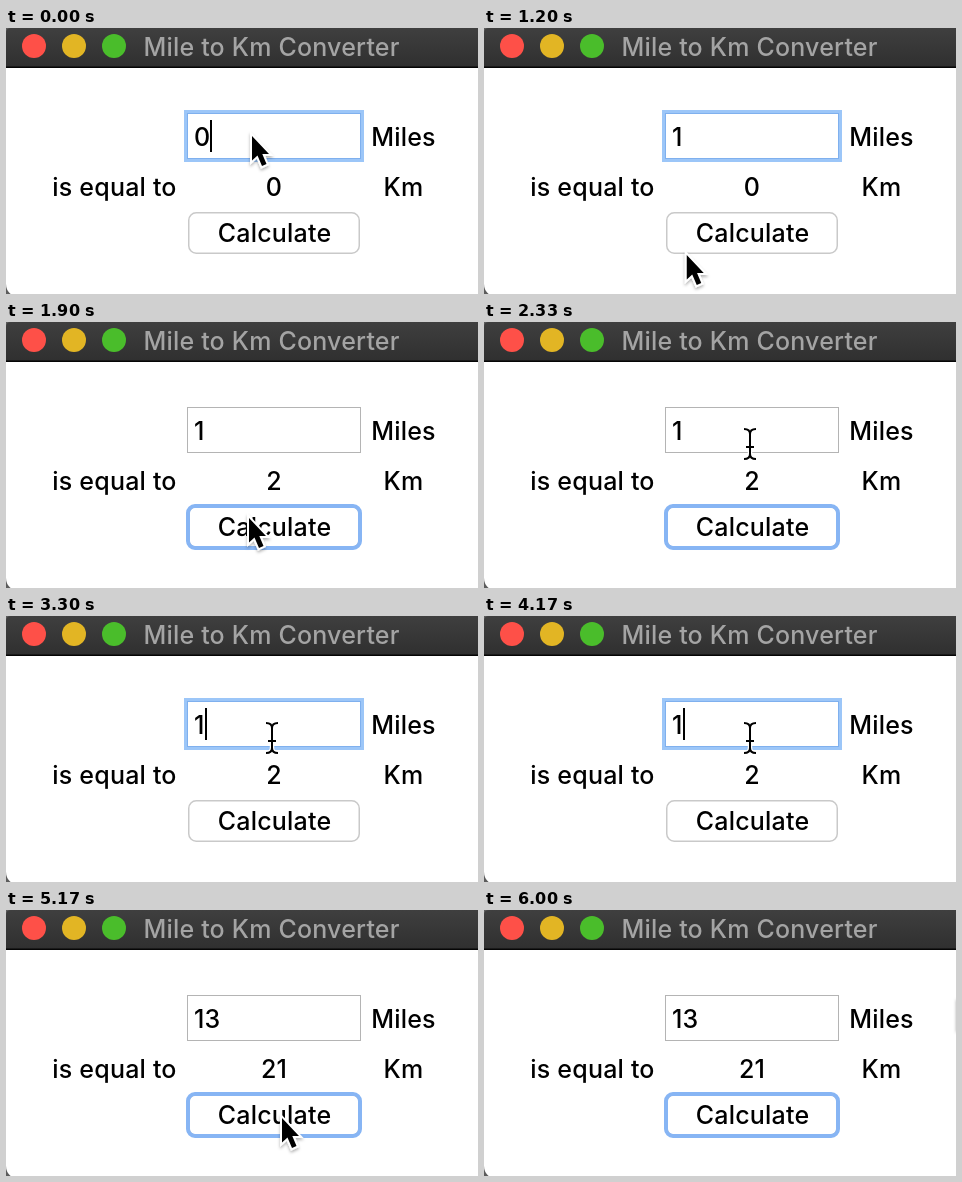
Recreate the animation shown at these times as an HTML page. Size 472x266 px, loop 6360 ms.

```html
<!DOCTYPE html>
<html lang="en">
<head>
<meta charset="utf-8">
<title>Mile to Km Converter</title>
<style>
  html, body { margin: 0; width: 100%; height: 100%; overflow: hidden; background: #fff; }
  svg { display: block; width: 472px; height: 266px; }
  text {
    font: 450 25px Inter, "Liberation Sans", sans-serif;
    font-optical-sizing: none;
    letter-spacing: .2px;
    fill: #000;
  }
  .mid { text-anchor: middle; }
  .line { fill: none; stroke: #000; stroke-width: 2; }
  .halo { fill: none; stroke: #fff; stroke-width: 4.5; }
</style>
</head>
<body>
<svg viewBox="0 0 472 266">
  <defs>
    <linearGradient id="bar" x2="0" y2="1">
      <stop stop-color="#3f3f3f"/><stop offset="1" stop-color="#2f2f2f"/>
    </linearGradient>
    <linearGradient id="blue" x2="0" y2="1">
      <stop stop-color="#4f9bf8"/><stop offset="1" stop-color="#176ee0"/>
    </linearGradient>
    <filter id="shadow" x="-50%" y="-50%" width="200%" height="200%">
      <feDropShadow dx="0" dy="2" stdDeviation="1.5" flood-opacity=".3"/>
    </filter>
    <path id="beam" d="M-6-15Q0-15 0-10V10Q0 15-6 15M6-15Q0-15 0-10M0 10Q0 15 6 15M-4 3H4"/>
  </defs>

  <!-- window -->
  <rect width="472" height="266" fill="#5c5c5c"/>
  <path d="M0 39V256Q0 263 6 267H472V39Z" fill="#fff"/>
  <path d="M0 40V5Q0 0 5 0H472V40Z" fill="url(#bar)"/>
  <rect y="38.5" width="472" height="1.5" fill="#050505"/>
  <circle cx="28" cy="18" r="12" fill="#fe5048"/>
  <circle cx="68" cy="18" r="12" fill="#e2b524"/>
  <circle cx="108" cy="18" r="12" fill="#4abd2b"/>
  <text class="mid" x="265.5" y="27.5" style="fill:#a4a4a4">Mile to Km Converter</text>

  <!-- labels -->
  <text class="mid" x="397.5" y="118">Miles</text>
  <text class="mid" x="108.5" y="168">is equal to</text>
  <text class="mid" x="397.5" y="168">Km</text>
  <text class="mid" x="268" y="168" id="result">0</text>

  <!-- entry -->
  <rect x="181.5" y="85.5" width="173" height="45" fill="#fff" stroke="#b4b4b4"/>
  <g id="entryRing" fill="none">
    <rect x="180" y="84" width="176" height="48" stroke="#9cc6f8" stroke-width="4"/>
    <rect x="181.5" y="85.5" width="173" height="45" stroke="#7fb0ee"/>
  </g>
  <text x="188" y="118" id="entry">0</text>
  <rect id="caret" y="92" width="2" height="32"/>

  <!-- button -->
  <rect x="182.75" y="184.75" width="170.5" height="40.5" rx="7.5" fill="#fff" stroke="#c9c9c9" stroke-width="1.5"/>
  <rect id="press" x="183" y="185" width="170" height="40" rx="7" fill="url(#blue)"/>
  <rect id="buttonRing" x="182" y="184" width="172" height="42" rx="7" fill="none" stroke="#87b5f4" stroke-width="4"/>
  <text class="mid" x="268.5" y="214" id="label">Calculate</text>

  <!-- pointers -->
  <g id="arrow" filter="url(#shadow)">
    <path d="M0 0V24.5L5.5 19.5L10 30L14.5 28L10.3 18H17Z" stroke="#fff" stroke-width="4" paint-order="stroke"/>
  </g>
  <g id="ibeam">
    <use href="#beam" class="halo"/>
    <use href="#beam" class="line"/>
  </g>
</svg>
<script>
  const LOOP = 6360, HOLD = 70, FADE = 60, TEXT_X = 188;
  const CLICK_1 = 1500, REFOCUS = 2370, CLICK_2 = 4970;
  const $ = id => document.getElementById(id);
  const show = (id, on) => $(id).setAttribute("visibility", on ? "visible" : "hidden");
  const clamp = v => Math.min(1, Math.max(0, v));
  const mix = (a, b, k) => a + (b - a) * k;
  const ease = k => k * k * (3 - 2 * k);

  // Pointer strokes; `via` bends the way into a quadratic curve
  const home = [246, 108];
  const moves = [
    { from: 950, until: 1450, to: [243, 196], via: [161, 302] },
    { from: 1900, until: 2300, to: [266, 122], via: [246, 252] },
    { from: 4667, until: 4833, to: [275, 216] },
    { from: 4967, until: 5133, to: [276, 208] },
    { from: 5667, until: 5767, to: [474, 92] }
  ];

  function pointerAt(t) {
    return moves.reduce((p, { from, until, to, via }) => {
      const k = ease(clamp((t - from) / (until - from)));
      return p.map((a, i) => {
        const c = via ? via[i] : mix(a, to[i], 0.5);
        return mix(mix(a, c, k), mix(c, to[i], k), k);
      });
    }, home);
  }

  function typedAt(t) {
    if (t < 665) return "0";
    return "13".slice(0, (t >= 900) + (t >= 4400));
  }

  // The sum is done when the button is let go
  function resultAt(t) {
    const last = [CLICK_2, CLICK_1].find(c => t >= c + HOLD);
    return last ? Math.round(typedAt(last) * 1.609) : 0;
  }

  function pressAt(t) {
    const down = t >= CLICK_2 ? CLICK_2 : CLICK_1;
    return t < down ? 0 : 1 - clamp((t - down - HOLD) / FADE);
  }

  // 600 ms on, 300 ms off
  function blinkAt(t) {
    const origin = t < REFOCUS ? 370 - 900 : REFOCUS;
    return (t - origin) % 900 < 600;
  }

  function draw(t) {
    const tick = Math.floor((t + 4) * 0.03) / 0.03; // the screen moves at 30 fps
    const onButton = (t >= CLICK_1 && t < REFOCUS) || t >= CLICK_2;
    show("entryRing", !onButton);
    show("buttonRing", onButton);

    $("entry").textContent = typedAt(t);
    $("result").textContent = resultAt(t);
    const atStart = t >= 2800 && t < 3300;
    const width = atStart ? 0 : $("entry").getComputedTextLength();
    $("caret").setAttribute("x", TEXT_X + Math.round(width));
    show("caret", !onButton && blinkAt(t));

    const press = pressAt(tick);
    $("press").setAttribute("opacity", press);
    $("label").style.fill = press > 0.5 ? "#fff" : "#000";

    const [x, y] = pointerAt(tick);
    const beam = t > 1900 && x < 356 && y < 131;
    show("ibeam", beam);
    show("arrow", !beam);
    $(beam ? "ibeam" : "arrow").setAttribute("transform", `translate(${x} ${y})`);
  }

  const start = performance.now();
  function loop() {
    draw((performance.now() - start) % LOOP);
    requestAnimationFrame(loop);
  }
  loop();
</script>
</body>
</html>
```
